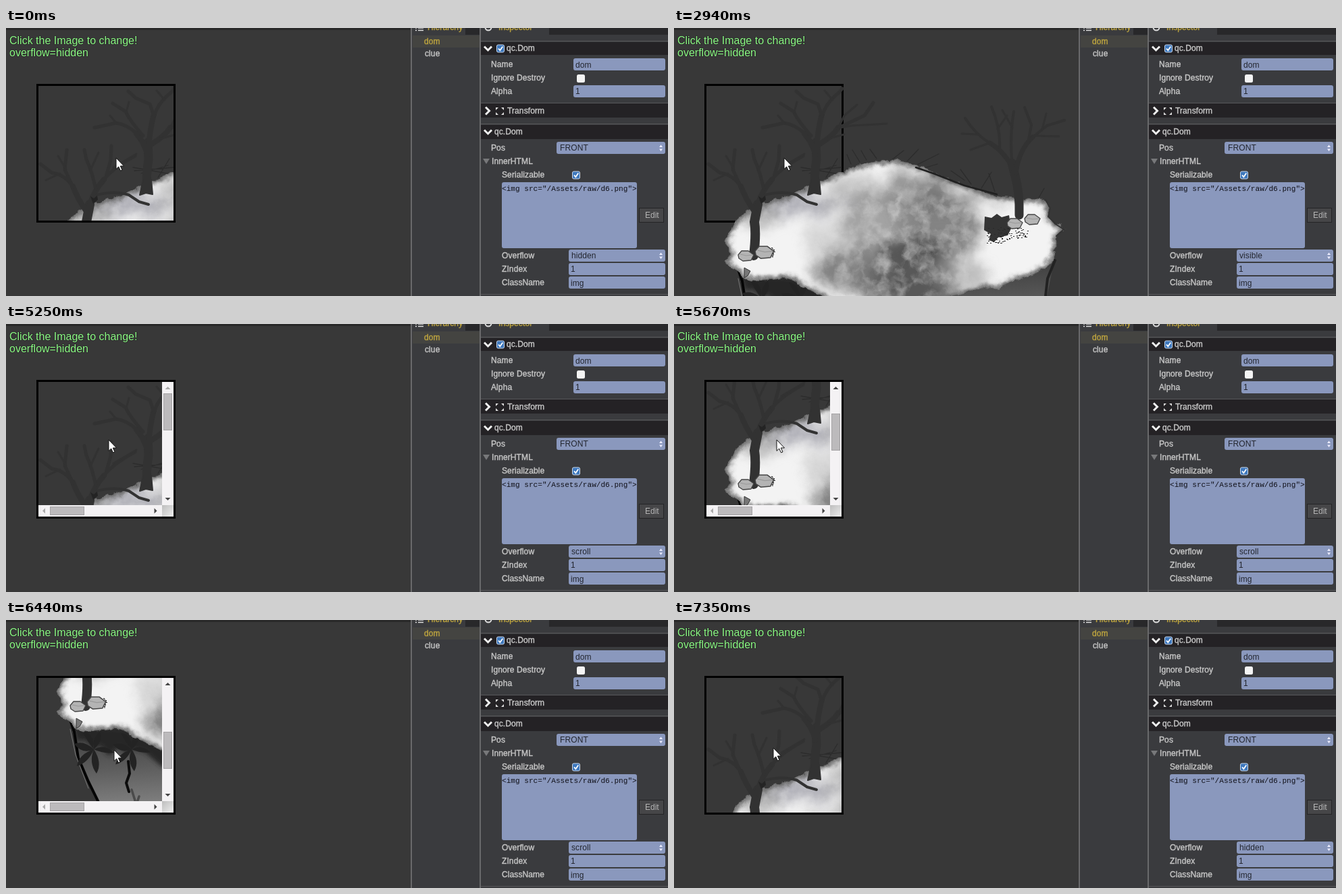
Animation of 980 by 398 pixels, one loop 8000 ms. Source, as an HTML page:

```html
<!DOCTYPE html>
<html lang="en">
<head>
<meta charset="utf-8">
<title>Overflow modes</title>
<style>
html, body { margin: 0; height: 100%; overflow: hidden; background: #383838; }
svg { display: block; width: 100vw; height: 100vh; font: 12px "Liberation Sans", Arial, sans-serif; }
text { white-space: pre; }
.label { fill: #c6c6c6; stroke: #c6c6c6; stroke-width: .4; letter-spacing: .1px; }
.gold { fill: #bda43f; stroke: #bda43f; }
.value { fill: #23262f; letter-spacing: .1px; }
.field { fill: #8a98bd; }
.head { fill: #242225; }
.code { font: 11.1px "Liberation Mono", monospace; fill: #101018; }
.title { font-size: 16px; fill: #8dfb86; stroke: #222; stroke-width: 1.2; paint-order: stroke; }
.tree, .line { fill: none; stroke: #323232; stroke-linecap: round; stroke-linejoin: round; }
.chevron { fill: none; stroke: #eee; stroke-width: 3; }
.rock { fill: #b4b4b4; stroke: #444; stroke-width: 1.3; stroke-linejoin: round; }
</style>
</head>
<body>
<svg viewBox="0 0 980 398" preserveAspectRatio="none">
<defs>
  <clipPath id="view"><rect id="viewBox" x="48" y="86"/></clipPath>
  <path id="snowShape" d="M90 289Q110 268 130 262L170 249 215 228Q260 206 300 198L325 196 345 200Q370 206 385 216L430 234 470 248Q520 255 548 255L556 268 553 280 566 291 573 292 577 300 566 309 566 325 562 343 545 360Q525 370 500 376L480 388 455 386 430 394 400 400 300 421Q260 414 231 404L190 384Q170 366 150 373L115 375 103 370 80 352 77 345 84 335 76 318 81 305Z"/>
  <clipPath id="snowClip"><use href="#snowShape"/></clipPath>
  <filter id="cloud" x="-10%" y="-10%" width="120%" height="120%" color-interpolation-filters="sRGB">
    <feTurbulence type="fractalNoise" baseFrequency=".03" numOctaves="4" seed="7"/>
    <feDisplacementMap in="SourceGraphic" scale="45" xChannelSelector="R" yChannelSelector="G"/>
    <feGaussianBlur stdDeviation="9" result="soft"/>
    <feTurbulence type="fractalNoise" baseFrequency=".05" numOctaves="4" seed="3"/>
    <feColorMatrix values="0 0 0 0 .9  0 0 0 0 .9  0 0 0 0 .9  1.2 0 0 0 -.45"/>
    <feComposite in2="soft" operator="in" result="veil"/>
    <feMerge><feMergeNode in="soft"/><feMergeNode in="veil"/></feMerge>
  </filter>
  <filter id="ragged" x="-5%" y="-5%" width="110%" height="110%" color-interpolation-filters="sRGB">
    <feTurbulence type="fractalNoise" baseFrequency=".09" numOctaves="2" seed="5"/>
    <feDisplacementMap in="SourceGraphic" scale="9" xChannelSelector="R" yChannelSelector="G"/>
    <feGaussianBlur stdDeviation=".7"/>
  </filter>
  <filter id="blur"><feGaussianBlur stdDeviation="3"/></filter>
  <linearGradient id="body" x1="0" y1="0" x2=".12" y2="1">
    <stop offset=".1" stop-color="#3a3a3a"/><stop offset=".42" stop-color="#5c5c5c"/>
    <stop offset=".65" stop-color="#7c7c7c"/><stop offset="1" stop-color="#4c4c4c"/>
  </linearGradient>
  <linearGradient id="corner" x2="1" y2="1"><stop stop-color="#bdbdbd"/><stop offset="1" stop-color="#eee"/></linearGradient>
  <path id="plant" fill="#232323" d="M0 0Q-15-14-29-8-17 8 0 0-22 7-25 25-8 20 0 0-8 20 4 36 13 20 0 0 14 7 30 5 15-9 0 0 14-12 9-27-3-15 0 0-10-12-17-27 1-24 0 0"/>
  <path id="stepper" fill="#eef" d="M967 4l2.500-3.500L972 4zM967 6.500l2.500 3.500 2.500-3.500z"/>
  <g id="checked"><rect width="11" height="11" rx="2" fill="#3e78bd" stroke="#c9d8ec"/><path d="M2.500 5.500l2.300 2.700 4-5.700" fill="none" stroke="#fff" stroke-width="1.800"/></g>
</defs>

<rect width="980" height="398" fill="#383838"/>
<rect width="600" height="3" fill="#292929"/>
<text class="title" x="5" y="24">Click the Image to change!</text>
<text class="title" x="5" y="42">overflow=hidden</text>
<rect x="46.500" y="84.500" width="203" height="203" fill="none" stroke="#000" stroke-width="3"/>

<g clip-path="url(#view)"><g id="picture">
  <path d="M84 340L100 375 107 415 122 450 150 507 185 515 231 536 320 560 450 540 540 450 552 398 564 340Z" fill="url(#body)"/>
  <path d="M100 366L106 390Q120 382 128 402L140 396 152 412 168 398 176 408 190 402 205 406 231 428 300 445V380Z" fill="#282828" filter="url(#blur)"/>
  <path class="line" d="M86 332L101 376 107 415 122 450 150 507 162 503 185 515 205 528 235 536" style="stroke:#050505;stroke-width:4"/>
  <path class="line" d="M95 372L103 410 122 460" style="stroke:#777;stroke-width:1"/>
  <path class="line" d="M564 345L553 372 550 398" style="stroke:#222;stroke-width:4"/>
  <path class="line" d="M181 420L183 438 178 452 182 465" style="stroke:#0c0c0c;stroke-width:4"/>
  <path class="line" d="M186 462L191 478 190 495 212 513 224 534M191 490L197 472" style="stroke:#4a4a4a;stroke-width:3.500"/>
  <use href="#plant" x="130" y="402"/>
  <use href="#plant" transform="translate(186 402) scale(.95 .9)"/>

  <g class="line" style="stroke-width:1.300;stroke:#2c2c2c">
    <path d="M188 207L250 218M190 212L248 207M200 216L240 204M225 222L242 194M262 202L256 188M275 199L264 181M285 196L277 182M300 194L290 180M322 196L340 182M345 198L362 180M360 203L392 187M370 208L390 202M430 226L410 212M440 232L424 210M455 238L470 214M475 243L466 216M540 252L548 238"/>
  </g>
  <g filter="url(#ragged)">
    <use href="#snowShape" fill="#f3f3f3" stroke="#555" stroke-width="1"/>
    <g clip-path="url(#snowClip)">
      <g filter="url(#cloud)">
        <ellipse cx="190" cy="258" rx="75" ry="16" fill="#9c9ca6" opacity=".8"/>
        <ellipse cx="265" cy="245" rx="45" ry="30" fill="#aaa" opacity=".65"/>
        <ellipse cx="125" cy="278" rx="24" ry="18" fill="#888" opacity=".7"/>
        <ellipse cx="365" cy="245" rx="55" ry="34" fill="#777" opacity=".75"/>
        <ellipse cx="390" cy="295" rx="60" ry="55" fill="#707070" opacity=".85"/>
        <ellipse cx="305" cy="290" rx="60" ry="45" fill="#8a8a8a" opacity=".75"/>
        <ellipse cx="225" cy="315" rx="35" ry="28" fill="#bbb" opacity=".6"/>
        <ellipse cx="350" cy="370" rx="65" ry="55" fill="#484848" opacity=".9"/>
        <ellipse cx="265" cy="360" rx="65" ry="30" fill="#666" opacity=".8"/>
        <ellipse cx="425" cy="360" rx="40" ry="30" fill="#999" opacity=".6"/>
        <ellipse cx="450" cy="250" rx="45" ry="12" fill="#777" opacity=".7"/>
      </g>
      <use href="#snowShape" fill="none" stroke="#666" stroke-width="9" filter="url(#blur)"/>
    </g>
  </g>
  <path class="line" d="M358 207L384 216 430 234 478 247" style="stroke:#202020;stroke-width:2.500"/>
  <path class="line" d="M550 255L557 268 554 280 566 292 577 299 566 309" style="stroke:#333;stroke-width:2"/>

  <path d="M460 280L470 282 478 276 485 281 496 278 499 298 494 308 480 311 474 318 466 315 469 306 459 300Z" fill="#343434"/>
  <g id="specks" fill="#2a2a2a"></g>

  <g class="tree">
    <path stroke-width="13" d="M209 238Q207 220 211 195L210 170"/>
    <path stroke-width="2" fill="#323232" d="M203 225L198 248 207 245 217 247 215 225Z"/>
    <path stroke-width="8" d="M209 188Q205 170 193 157M211 178Q213 150 219 128M216 172Q236 160 243 148"/>
    <path stroke-width="5" d="M195 158Q179 143 163 141L131 148M203 160Q184 139 177 124L158 112M219 132Q224 112 244 96L249 90M242 149L265 138 282 130 295 111M218 128L213 113 192 104 181 94"/>
    <path stroke-width="3" d="M163 141L154 130M178 125L182 110M235 107L223 93M246 148L264 145 315 142M244 147L252 130 271 114M226 165L252 158"/>
    <path stroke-width="14" d="M118 338Q122 305 119 288L124 262"/>
    <path stroke-width="8" d="M123 266Q129 243 145 225M120 274Q105 252 99 235"/>
    <path stroke-width="5" d="M145 225Q158 208 191 190M133 240Q128 215 119 195L116 181M99 236Q88 218 68 215L51 202M148 221L155 196 156 175M97 232L87 210 90 181"/>
    <path stroke-width="3" d="M159 207L193 187M125 211L137 185M80 216L59 226M89 210L77 190"/>
    <path stroke-width="4" d="M126 250Q160 240 182 248L197 258 211 262"/>
    <path stroke-width="13" d="M511 278Q512 245 505 220L500 200"/>
    <path stroke-width="7" d="M504 213Q490 184 468 171M506 215Q511 180 531 162"/>
    <path stroke-width="4" d="M469 172Q446 158 431 134M482 181Q484 150 470 117M500 194Q497 160 503 124M529 164L552 145 578 137M524 171L529 144 519 118"/>
    <path stroke-width="3" d="M449 158L426 157M479 150L493 130M545 151L551 127M536 160L570 161M466 171L439 181M501 148L486 122"/>
  </g>
  <path d="M125 250l5 3 5-4 1 6-7 6z" fill="#242424"/>
  <g id="rock"><path class="rock" d="M95 337L100 331 110 331 118 337 114 345 102 346 96 342Z"/><path d="M98 336l9 2 10-1" fill="none" stroke="#999"/></g>
  <use href="#rock" transform="translate(6 -73) scale(1.200)"/>
  <use href="#rock" transform="translate(398 -48)"/>
  <use href="#rock" transform="translate(424 -54)"/>
  <path d="M104 356l9 5-4 7-5 3z" fill="#777" stroke="#333"/>
</g></g>

<g id="bars">
  <path d="M231 86h17v183h-17zM48 269h183v17H48z" fill="#f4f2f4"/>
  <rect x="231" y="269" width="17" height="17" fill="url(#corner)"/>
  <rect id="thumb" x="233.500" width="12" height="54" fill="#bcbabc" stroke="#a5a3a5"/>
  <rect x="65.500" y="271.500" width="50" height="12" fill="#bcbabc" stroke="#a5a3a5"/>
  <path id="upArrow" d="M235.500 97l4-4 4 4z"/>
  <path id="downArrow" d="M235.500 258l4 4 4-4z"/>
  <path d="M58 273.500l-4 4 4 4z" fill="#aaa"/>
  <path d="M219.500 273.500l4 4-4 4z" fill="#444"/>
</g>

<rect x="599" width="381" height="398" fill="#3a3b3e"/>
<path d="M680 0h21v10h-21zM804 0h176v10H804z" fill="#28282a"/>
<rect x="602" y="11" width="99" height="18" fill="#444441"/>
<path d="M600 0V398M702 0V398" stroke="#69696b" stroke-width="2"/>
<path d="M606 0h2m2 0h8M606 3.500h2m2 0h8" stroke="#ddd" stroke-width="1.500"/>
<circle cx="714" cy="-1" r="4.500" fill="none" stroke="#ddd" stroke-width="2"/>
<g class="label">
  <text class="gold" x="624" y="3">Hierarchy</text>
  <text class="gold" x="729" y="3">Inspector</text>
  <text class="gold" x="619" y="24">dom</text>
  <text x="620" y="42">clue</text>
</g>
<path class="head" d="M703 21h277v19H703zM703 112h277v21H703zM703 144h277v21H703z"/>
<path d="M703 19.500h277M703 111.500h277M703 142.500h277M703 395.500h277" stroke="#58585a"/>
<path class="chevron" d="M708 27.500l5.500 5.500 5.500-5.500M710 117.500l5.500 5.500-5.500 5.500M708 151.500l5.500 5.500 5.500-5.500"/>
<path d="M725 118h4l-4 4zM737 118h-4l4 4zM725 129h4l-4-4zM737 129h-4l4-4z" fill="#ddd"/>
<path d="M706 194h10l-5 8z" fill="#77787a"/>
<use href="#checked" x="726.500" y="25"/>
<use href="#checked" x="838.500" y="213"/>
<rect x="845" y="69" width="12" height="12" rx="2.500" fill="#f4f4f4"/>
<g class="label">
  <text x="741" y="34">qc.Dom</text><text x="718" y="58">Name</text>
  <text x="718" y="78">Ignore Destroy</text><text x="718" y="98">Alpha</text>
  <text x="742" y="127">Transform</text><text x="723" y="158">qc.Dom</text>
  <text x="718" y="182">Pos</text><text x="719" y="202">InnerHTML</text>
  <text x="734" y="222">Serializable</text><text x="734" y="342">Overflow</text>
  <text x="734" y="362">ZIndex</text><text x="734" y="382">ClassName</text>
</g>
<g class="field">
  <rect x="840" y="45" width="136" height="18" rx="3"/><rect x="840" y="85" width="136" height="18" rx="3"/>
  <rect x="815" y="169" width="161" height="18" rx="3"/><rect x="734" y="229" width="200" height="98" rx="3"/>
  <rect x="833" y="329" width="143" height="18" rx="3"/><rect x="833" y="349" width="143" height="18" rx="3"/>
  <rect x="833" y="369" width="143" height="18" rx="3"/>
</g>
<use href="#stepper" y="173"/>
<use href="#stepper" y="333"/>
<g class="value">
  <text x="843" y="59">dom</text><text x="843" y="98">1</text><text x="820" y="182">FRONT</text>
  <text id="overflow" x="837" y="342"></text><text x="836" y="362">1</text><text x="836" y="383">img</text>
</g>
<text class="code" x="734" y="242">&lt;img src="/Assets/raw/d6.png"&gt;</text>
<rect x="937.500" y="267.500" width="36" height="21" fill="#464648" stroke="#242426"/>
<text x="946" y="282" fill="#b5b5b5">Edit</text>

<path id="cursor" d="M0 0V16.500L3.700 13 6.500 19 9 18 6.300 12H11.500Z" fill="#fff" stroke="#111"/>
</svg>
<script>
const $ = id => document.getElementById(id);
const LOOP = 8000, TICK = 70, MAX_SCROLL = 310;
const modes = [[0, 'hidden'], [1190, 'auto'], [2940, 'visible'], [5250, 'scroll'], [7350, 'hidden']];
const scrolls = [[0, 0], [5670, 100], [5810, 200], [5880, 300], [5950, 310], [6440, 210], [6510, 110], [6650, 10]];
const views = { hidden: [200, 200], auto: [183, 183], scroll: [183, 183], visible: [535, 493] };
// start, end, from, to
const moves = [
  [3920, 4130, [163, 193], [152, 172]],
  [5740, 6300, [152, 172], [160, 193]],
  [6860, 7070, [160, 193], [147, 190]],
];

const random = n => { const v = Math.sin(n * 127.1) * 43758.5453; return v - Math.floor(v); };
const valueAt = (steps, t) => steps.filter(([start]) => start <= t).pop()[1];

function cursorAt(t) {
  const [start, end, from, to] = moves.filter(m => m[0] <= t).pop() || moves[0];
  const time = Math.floor(t / TICK) * TICK;
  const p = Math.min(1, Math.max(0, (time - start) / (end - start))) ** 1.5;
  return from.map((v, i) => Math.round(v + (to[i] - v) * p));
}

function scatterSpecks() {
  let d = '';
  for (let i = 0; i < 100; i++) {
    const x = 463 + random(i) * 60, y = 296 + random(i + 200) * (27 - (x - 463) / 6);
    d += `M${Math.round(x)} ${Math.round(y)}h2v1h-2z`;
  }
  for (let i = 0; i < 10; i++) d += `M${144 + Math.round(random(i) * 4)} ${326 + i * 1.5}h2v1h-2z`;
  $('specks').innerHTML = `<path d="${d}"/>`;
}

let shown = '';
function draw(now) {
  const t = now % LOOP, mode = valueAt(modes, t), scroll = valueAt(scrolls, t);
  if (shown !== mode + scroll) {
    shown = mode + scroll;
    const [width, height] = views[mode];
    $('viewBox').setAttribute('width', width);
    $('viewBox').setAttribute('height', height);
    $('picture').setAttribute('transform', `translate(0 ${-scroll})`);
    $('bars').style.display = mode === 'auto' || mode === 'scroll' ? '' : 'none';
    $('thumb').setAttribute('y', 103.5 + Math.round(scroll * .3));
    $('upArrow').style.fill = scroll > 0 ? '#444' : '#aaa';
    $('downArrow').style.fill = scroll < MAX_SCROLL ? '#444' : '#aaa';
    $('overflow').textContent = mode;
  }
  $('cursor').setAttribute('transform', `translate(${cursorAt(t)})`);
}

scatterSpecks();
const began = performance.now();
function frame() {
  draw(performance.now() - began);
  requestAnimationFrame(frame);
}
frame();
</script>
</body>
</html>
```
